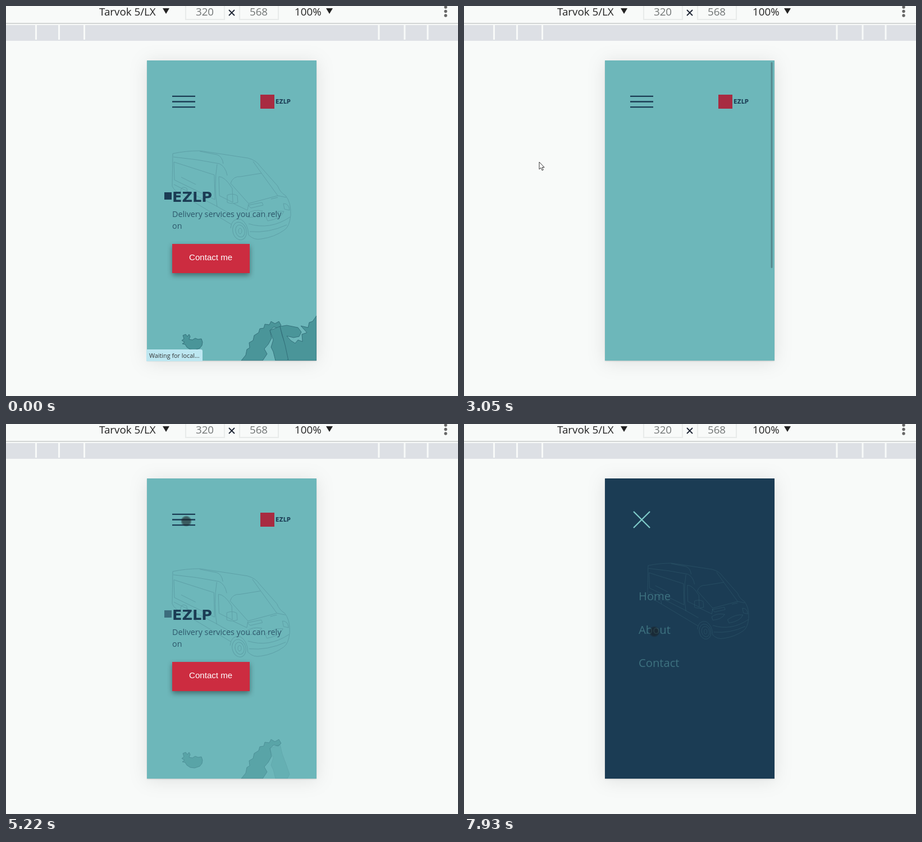
These frames come from a looping animation (805x695 px, 7.99 s). An HTML page:

```html
<!DOCTYPE html>
<html lang="en">
<head>
<meta charset="utf-8">
<title>Mobile page preview</title>
<style>
  html, body { margin: 0; width: 100%; height: 100%; overflow: hidden; background: #f8faf9; }
  svg { display: block; width: 100vw; height: 100vh; font-family: "Open Sans", "Noto Sans", sans-serif; }
  .bar { font-size: 18.8px; fill: #222; }
  .size { font-size: 18.8px; fill: #717575; text-anchor: middle; }
  .brand { font-family: "DejaVu Sans", sans-serif; font-weight: 700; fill: #1b3c54; }
  .field { fill: none; stroke: #e8ebea; stroke-width: 2; }
  .land path { fill: #4a9599; stroke: #2c6672; stroke-width: .8; }
  #device { filter: drop-shadow(0 1px 1px rgba(0,0,0,.15)) drop-shadow(0 3px 16px rgba(0,0,0,.1)); }
  #button rect { filter: drop-shadow(0 4px 5px rgba(0,0,0,.4)); }
  #menu text { font-size: 20.2px; fill: #3e7280; }
</style>
</head>
<body>
<svg viewBox="0 0 805 695">
  <defs>
    <g id="vanShape" fill="none" stroke-linejoin="round">
      <path d="M297 263Q320 258 346 258L431 271Q446 275 453 286L484 321Q488 332 498 338Q508 350 507 373Q505 393 496 399Q478 412 455 415Q442 418 432 408M297 263L296 321Q300 331 316 338L401 389"/>
      <path d="M298 269L340 274L380 281Q391 286 394 302M345 259L376 265Q385 268 387 281M299 278L371 301L372 345L300 310ZM299 318L372 355L402 372M376 282Q370 320 376 358M312 305L338 318"/>
      <path d="M379 304Q390 304 403 325L404 350L380 338ZM400 316Q404 303 418 304L455 298L484 338L432 352ZM455 298L440 277M394 337Q404 333 412 338L413 350Q403 354 394 350Z"/>
      <path d="M405 352L430 364L432 353M484 338L499 341M431 355L456 350L458 355L436 360ZM472 344L484 341M430 370Q440 362 457 365Q450 376 432 377ZM494 352Q504 352 505 364L496 362ZM463 376Q480 364 495 366Q490 379 466 383ZM432 388Q470 400 506 376M434 402Q468 405 500 390"/>
      <ellipse cx="416" cy="401" rx="12" ry="16" transform="rotate(-15 416 401)"/>
      <ellipse cx="417" cy="401" rx="8" ry="11" transform="rotate(-15 417 401)"/>
      <ellipse cx="417" cy="401" rx="3" ry="5"/>
      <path d="M400 396Q402 377 418 380Q431 387 432 408M311 336Q310 318 322 325L325 343"/>
    </g>
    <radialGradient id="touch">
      <stop offset=".7" stop-color="#191e23"/>
      <stop offset="1" stop-color="#191e23" stop-opacity=".35"/>
    </radialGradient>
    <clipPath id="screen"><rect x="251" y="97" width="302" height="535"/></clipPath>
  </defs>

  <!-- toolbar -->
  <text class="bar" x="166" y="17">Tarvok 5/LX</text>
  <path d="M279 4h12l-6 10zM570 4h12l-6 10z" fill="#222"/>
  <rect class="field" x="320" y="-10" width="69" height="34"/>
  <rect class="field" x="416" y="-10" width="69" height="34"/>
  <text class="size" x="354" y="17">320</text>
  <text class="size" x="450" y="17">568</text>
  <path d="M397 7l10 10m0-10l-10 10" stroke="#1c2433" stroke-width="1.8"/>
  <text class="bar" x="514" y="17">100%</text>
  <g fill="#666"><circle cx="783" cy="2" r="2.7"/><circle cx="783" cy="9.5" r="2.7"/><circle cx="783" cy="17" r="2.7"/></g>
  <path d="M0 31h805" stroke="#c6c8c9" stroke-width="1.4"/>
  <rect y="34" width="805" height="28" fill="#dde0e5"/>
  <path d="M53.5 34v26m41-26v26m45-26v26M664 34v26m46-26v26m41-26v26" stroke="#f8faf9" stroke-width="3"/>

  <!-- page -->
  <rect id="device" x="251" y="97" width="302" height="535" fill="#6db7ba"/>
  <g clip-path="url(#screen)">
    <g class="land">
      <path d="M315 587l5-2 3 4 3-4 2 4-2 5 6 1 5-3 5 2 6-1 2 6-1 6-4 5-9 3-8-1-6-4-3-5-5-1 4-3-5-3 4-3z"/>
      <path d="M419 632L427 622 429 612 434 609 433 600 440 596 442 587 450 582 452 575 459 574 461 567 469 568 472 562 479 566 486 562 490 569 485 574 477 572 470 578 473 592 467 603 460 611 465 620 457 632Z"/>
      <path d="M470 578L488 571 492 588 498 604 505 624 501 632 480 632 476 616 472 608 476 595Z"/>
      <path d="M488 571L500 569 520 573 526 581 522 589 512 591 500 588 507 596 515 601 520 595 528 598 527 585 536 582 525 570 538 573 540 564 546 562 553 552V632H503L497 604Z"/>
    </g>
    <use id="van" href="#vanShape" stroke="#1b3c54"/>
    <g id="title"></g>
    <rect id="mark" x="282" y="332" width="13" height="13" fill="#1b3c54"/>
    <g id="tagline" font-size="14.3" fill="#1b3c54" fill-opacity=".78">
      <text x="296" y="376">Delivery services you can rely</text>
      <text x="296" y="397">on</text>
    </g>
    <g id="button">
      <rect x="296" y="424" width="138" height="52" fill="#cc2c40"/>
      <text x="326" y="453" font-size="15.1" fill="#fff" font-family="Liberation Sans, Arial, sans-serif">Contact me</text>
    </g>
    <g id="logo">
      <rect x="453" y="158" width="25" height="25" fill="#a82b41"/>
      <text class="brand" x="480" y="174" font-size="9.7">EZLP</text>
    </g>
    <rect id="scroll" x="546.5" y="100" width="3" height="367" rx="1.5" fill="#55888d"/>

    <g id="menu">
      <rect x="251" y="97" width="302" height="535" fill="#1b3c54"/>
      <use href="#vanShape" stroke="#7ecbc8" stroke-opacity=".14" transform="translate(327 248) scale(.853) translate(-296 -258)"/>
      <text x="311" y="314">Home</text>
      <text x="311" y="374">About</text>
      <text x="311" y="433">Contact</text>
    </g>
    <g id="burger" stroke-width="2.3">
      <path d="M-20.5 0h41"/><path d="M-20.5 0h41"/><path d="M-20.5 0h41"/>
    </g>
  </g>
  <g id="status">
    <path d="M250 633v-21h97q3 0 3 3v18z" fill="#bde7f1"/>
    <text x="255" y="626.5" font-size="10.8" fill="#333">Waiting for local...</text>
  </g>

  <g id="volume">
    <rect x="38" width="61" height="108.500" fill="#1c1d1d"/>
    <rect x="63" width="11" height="37" fill="#6a6a6a"/>
    <rect x="63" y="36" width="11" height="11" fill="#fff"/>
    <rect x="63" y="47" width="11" height="23" fill="#0078d7"/>
    <text x="68" y="91" font-size="12" fill="#fff" text-anchor="middle">36</text>
  </g>
  <path id="arrow" d="M0 0V13L3 10.200 5.200 15 7.200 14 5.200 9.500H9Z" fill="#fff" stroke="#222" stroke-width=".9"/>
  <circle id="dot" r="9.500" fill="url(#touch)"/>
</svg>
<script>
const LOOP = 7990, RELOAD = 1050;
const $ = id => document.getElementById(id);
const set = (el, name, value) => el.setAttribute(name, value);
const show = (el, on) => set(el, "opacity", +on);
const clamp = v => Math.max(0, Math.min(1, v));
const easeOut = v => 1 - (1 - v) ** 2.3;
const cubicOut = v => 1 - (1 - v) ** 3;
const backOut = v => 1 + 2 * (v - 1) ** 3 + (v - 1) ** 2;
const smooth = v => v * v * (3 - 2 * v);

// Title letters, laid out by their own widths
let pen = 296;
const letters = [..."EZLP"].map(ch => {
  const el = document.createElementNS("http://www.w3.org/2000/svg", "text");
  el.textContent = ch;
  set(el, "class", "brand");
  set(el, "font-size", 25.6);
  set(el, "x", pen);
  set(el, "y", 348.5);
  $("title").append(el);
  pen += el.getComputedTextLength();
  return el;
});

const lands = [...document.querySelectorAll(".land path")];
const landFade = [[.55, .1], [.55, .1], [.2, .25], [0, 0]];
const items = [...document.querySelectorAll("#menu text")];
const bars = [...$("burger").children];

// time, x, y
const pointer = [
  [1740, 165, -20], [2450, 134, 278], [3300, 134, 278], [3850, 112, 254],
  [4020, 112, 254], [4160, 129, 243], [4280, 205, 187], [4480, 321, 173],
  [7150, 321, 173], [7920, 339, 370]
];

function pointerAt(t) {
  const i = pointer.findIndex(k => k[0] > t);
  if (i < 0) return pointer.at(-1).slice(1);
  if (i === 0) return [-50, -50];
  const [t0, x0, y0] = pointer[i - 1], [t1, x1, y1] = pointer[i];
  const raw = (t - t0) / (t1 - t0);
  const p = t > 4020 && t < 4480 ? raw : smooth(raw);
  return [x0 + (x1 - x0) * p, y0 + (y1 - y0) * p];
}

// Shrinks and rises into place around (cx, cy)
function settle(el, v, cx, cy) {
  const rest = 1 - backOut(v), scale = 1 + .22 * rest;
  set(el, "transform", `translate(${cx} ${cy + 44 * rest}) scale(${scale}) translate(${-cx} ${-cy})`);
  set(el, "opacity", clamp(v * 1.7));
}

function draw(t) {
  const span = (start, length) => clamp((t - start) / length);
  const load = (start, length) => t < RELOAD ? 1 : span(start, length);

  const header = t < 1180 || t >= 1800;
  show($("logo"), header);
  show($("burger"), header);
  show($("status"), t < 1900);
  show($("volume"), t >= 520 && t < 2950);
  set($("scroll"), "opacity", t < 3000 ? 0 : 1 - span(4160, 340));

  lands.forEach((el, i) => {
    const [first, second] = landFade[i];
    set(el, "opacity", t < RELOAD ? 1 : first * span(3800, 350) + second * span(5500, 300));
  });

  const grow = load(3400, 1900), scale = .8 + .2 * grow;
  set($("van"), "transform", `translate(296 ${254 + 4 * grow}) scale(${scale}) translate(-296 -258)`);
  set($("van"), "opacity", .19 * load(3380, 350));

  letters.forEach((el, i) => {
    const p = cubicOut(load(3120 + 220 * i, 500));
    set(el, "transform", `translate(${200 * (1 - p)} 0)`);
    set(el, "opacity", p);
  });
  set($("mark"), "opacity", load(4630, 1000));
  settle($("tagline"), load(3850, 550), 401.5, 381.5);
  set($("button"), "opacity", load(4200, 400));

  const open = easeOut(span(5640, 620));
  set($("menu"), "transform", `translate(0 97) scale(1 ${open}) translate(0 -97)`);
  set($("menu"), "opacity", open);
  items.forEach((el, i) => settle(el, span(6300 + 130 * i, 450), i < 2 ? 340 : 347, 307 + 59.5 * i));

  const cross = easeOut(span(5640, 420));
  $("burger").style.stroke = `color-mix(in srgb, #1b3c54, #7ecbc8 ${cross * 100}%)`;
  bars.forEach((el, i) => {
    const side = i - 1;
    set(el, "transform", `translate(316.5 ${170.5 + 9.6 * side * (1 - cross)}) rotate(${-45 * side * cross})`);
    set(el, "opacity", side ? 1 : 1 - cross);
  });

  const [x, y] = pointerAt(t), inside = x > 251;
  for (const id of ["arrow", "dot"]) set($(id), "transform", `translate(${x} ${y})`);
  show($("arrow"), !inside);
  set($("dot"), "opacity", inside ? (t >= 5430 && t < 7150 ? .72 : .6) : 0);
}

const begin = performance.now();
function tick() {
  draw((performance.now() - begin) % LOOP);
  requestAnimationFrame(tick);
}
tick();
</script>
</body>
</html>
```
